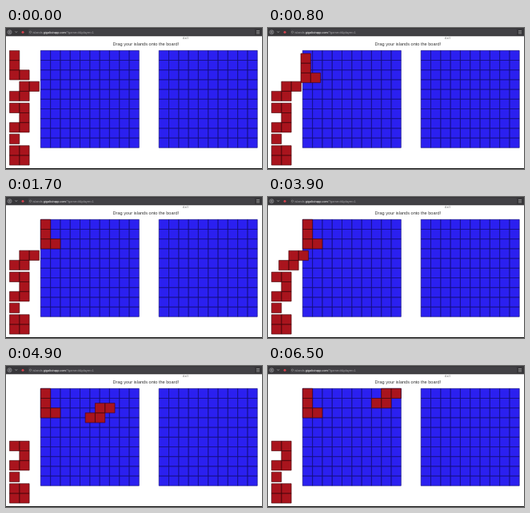
Recreate the animation shown at these times as an HTML page. Size 320 by 177 pixels, loop 8 s.

```html
<!DOCTYPE html>
<html lang="en">
<head>
<meta charset="utf-8">
<title>Islands</title>
<style>
  html, body { margin: 0; height: 100%; overflow: hidden; background: #fff; }
  svg { display: block; width: 100%; height: 100%; }
  text { font-family: "Liberation Sans", Arial, sans-serif; text-rendering: geometricPrecision; }
  .sea { fill: #2b20f0; stroke: #15107f; stroke-width: .65; }
  .land { fill: #a9141d; stroke: #48090d; stroke-width: .65; }
</style>
</head>
<body>
<svg viewBox="0 0 320 177">
  <rect width="320" height="10.3" fill="#38373a"/>
  <rect x="28" y="1.3" width="283" height="7.7" rx="1" fill="#424145"/>
  <g fill="none" stroke="#aaa" stroke-width=".7">
    <circle cx="4.5" cy="5.2" r="2.6" fill="#59585c" stroke="#858488"/>
    <path d="M5.3 3.9L3.9 5.2L5.3 6.5M11.5 4.2L12.8 5.7L14.1 4.2"/>
    <circle cx="30.5" cy="5.2" r="1.2" stroke-width=".5"/>
    <path d="M313 3.5h4M313 5.2h4M313 6.9h4"/>
  </g>
  <circle cx="21" cy="5.2" r="1.5" fill="#d5424d"/>
  <text x="33.5" y="6.5" font-size="3.9" fill="#a9a8ac">islands.<tspan fill="#fff">gigalixirapp.com</tspan>/?game=it&amp;player=1</text>
  <text x="221" y="14.3" font-size="3.3" fill="#555">EXIT</text>
  <text x="133.6" y="21.5" font-size="5.58" fill="#333">Drag your islands onto the board!</text>
  <g id="stage"></g>
  <rect y="176" width="320" height="1" fill="#111"/>
</svg>
<script>
const W = 12.3, H = 12.2, LOOP = 8000;
const stage = document.getElementById('stage');

// Each row is a string; '#' marks a filled cell.
function grid(rows, kind, x, y) {
  const path = document.createElementNS('http://www.w3.org/2000/svg', 'path');
  let d = '';
  rows.forEach((row, r) => [...row].forEach((c, i) => {
    if (c === '#') d += `M${i * W} ${r * H}h${W}v${H}h${-W}z`;
  }));
  path.setAttribute('d', d);
  path.setAttribute('class', kind);
  stage.append(path);
  place(path, x, y);
  return path;
}

function place(el, x, y) {
  el.setAttribute('transform', `translate(${x} ${y})`);
}

const sea = Array(10).fill('#'.repeat(10));
grid(sea, 'sea', 43.3, 28.3);
grid(sea, 'sea', 191.2, 28.3);
grid(['##', '.#', '##'], 'land', 4.5, 94.3);
grid(['#'], 'land', 4.5, 133.2);
grid(['##', '##'], 'land', 4.5, 147.7);

// Drag paths: [time, x, y]
const drags = [
  { el: grid(['#.', '#.', '##'], 'land', 4.5, 28.4), path: [
    [300, 4.5, 28.4], [800, 41, 32], [1200, 43.8, 28.8], [1700, 43.3, 28.3]] },
  { el: grid(['.##', '##.'], 'land', 4.5, 67.2), path: [
    [3800, 4.5, 67.2], [3900, 13.6, 67.4], [4200, 27, 83], [4300, 27, 83],
    [4400, 70, 66], [4500, 85, 55.4], [4700, 85, 55.4],
    [5300, 127.4, 29.2], [5400, 127.4, 29.2], [5800, 129.4, 28.3]] }
];

function at(path, t) {
  const i = path.findIndex(p => p[0] > t);
  if (i === 0) return path[0].slice(1);
  if (i < 0) return path[path.length - 1].slice(1);
  const a = path[i - 1], b = path[i], k = (t - a[0]) / (b[0] - a[0]);
  return [1, 2].map(n => a[n] + (b[n] - a[n]) * k);
}

function draw(now) {
  const t = Math.floor(now % LOOP / 100) * 100; // ten steps a second
  for (const { el, path } of drags) place(el, ...at(path, t));
  requestAnimationFrame(draw);
}
draw(performance.now());
</script>
</body>
</html>
```
